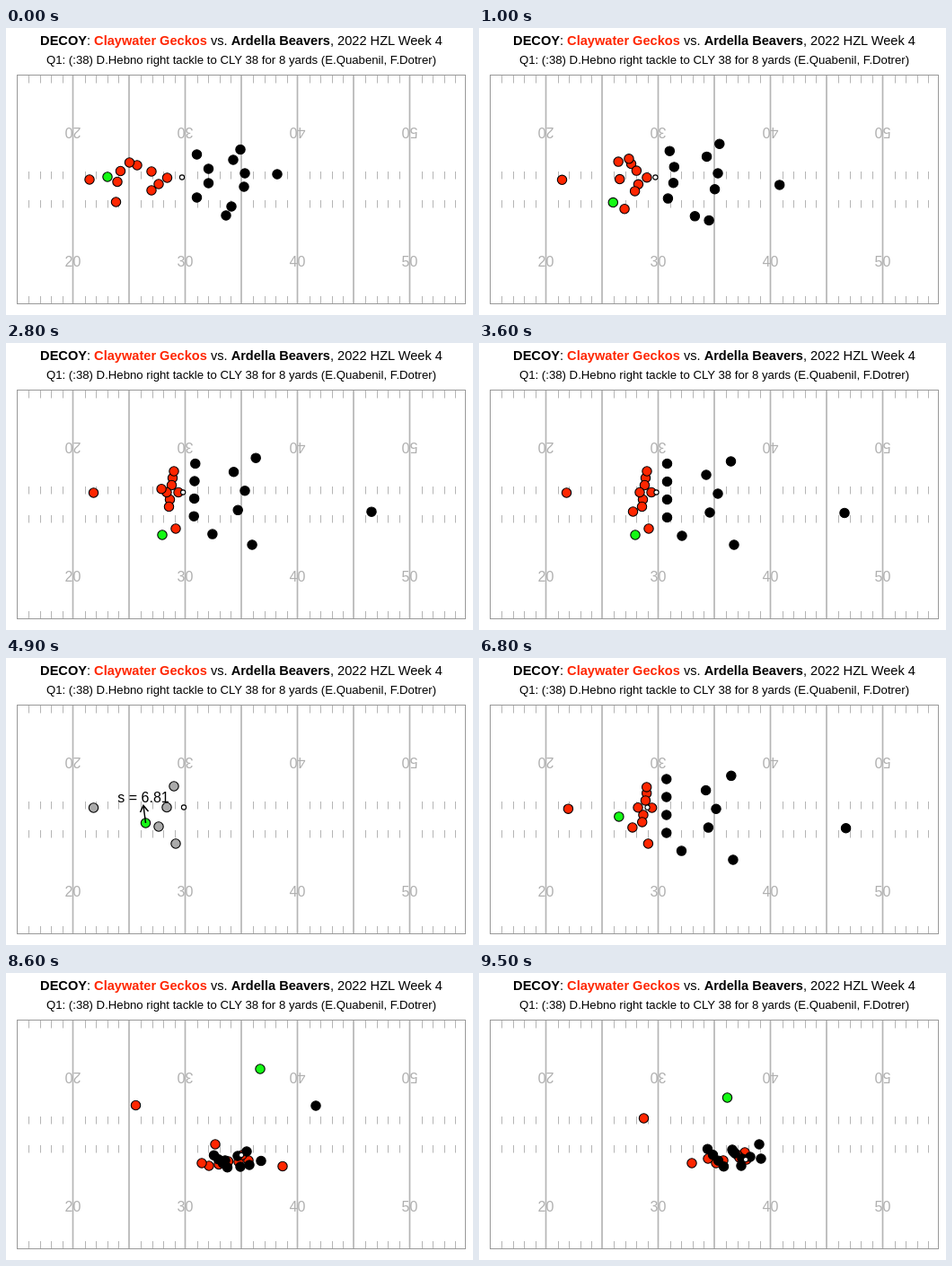
Animation of 520x320 px, one loop 10000 ms. Source, as an HTML page with a canvas:

```html
<!DOCTYPE html>
<html lang="en">
<head>
<meta charset="utf-8">
<title>Decoy play</title>
<style>
  html, body { margin: 0; width: 100%; height: 100%; overflow: hidden; background: #fff; }
  canvas { position: absolute; left: 0; top: 0; }
  p {
    position: absolute; left: 2px; width: 520px; margin: 0; z-index: 1;
    text-align: center; white-space: nowrap; color: #000;
    font-family: "Liberation Sans", Arial, sans-serif;
  }
  .title { top: 5px; font-size: 14.6px; line-height: 18px; }
  .title .home { color: #ff2600; }
  .play { top: 27px; font-size: 13.2px; line-height: 18px; }
</style>
</head>
<body>
<p class="title"><b>DECOY</b>: <b class="home">Claywater Geckos</b> vs. <b>Ardella Beavers</b>, 2022 HZL Week 4</p>
<p class="play">Q1: (:38) D.Hebno right tackle to CLY 38 for 8 yards (E.Quabenil, F.Dotrer)</p>
<canvas id="stage" width="520" height="320"></canvas>
<script>
const ctx = document.getElementById('stage').getContext('2d');
const FONT = '16px "Liberation Sans", Arial, sans-serif';
const LOOP = 10000, STEP = 100, RESUME = 6800;
const PHASES = { huddle: 0, set: 2100, shift: 3600, snap: 4900, mesh: 5800, hole: 6800, pile: 7700 };
const SNAP = PHASES.snap, END = PHASES.pile;
const RED = '#ff2600', GREEN = '#14fa14', GREY = '#aaa', BLACK = '#000';

// A pose is [x, y, dx, dy, bend]: player i stands at x + dx*i + bend*|i|, y + dy*i
const spot = ([x, y, dx = 0, dy = 0, bend = 0], i) => [x + dx * i + bend * Math.abs(i), y + dy * i];

// One path per player; a phase without a pose keeps the last, numeric keys are extra times
function unit(slots, poses) {
  return slots.map(i => {
    const keys = [];
    let pose;
    for (const phase in PHASES) {
      pose = poses[phase] || pose;
      keys.push([PHASES[phase], ...spot(pose, i)]);
    }
    for (const k in poses) if (!(k in PHASES)) keys.push([+k, ...spot(poses[k], i)]);
    return keys.sort((a, b) => a[0] - b[0]);
  });
}
const solo = poses => unit([0], poses)[0];

const line = [
  ...unit([-2, -1, 1, 2], {
    huddle: [178, 167, 4, 7, -12], set: [183.5, 166.5, -1, 8],
    mesh: [213, 185, -10, 8], hole: [248, 212, -11, 1.5], pile: [280, 206, -8, 3]
  }),
  solo({ huddle: [179.5, 167], set: [192, 166.5], mesh: [217.5, 187], hole: [247.5, 210], pile: [283, 199] })
];

const qb = solo({
  huddle: [124, 171.5], set: [179, 166.5], mesh: [104, 174], 6000: [94, 173],
  hole: [144.5, 147.5], pile: [183.5, 162]
});
const back = solo({
  huddle: [93, 169], 500: [91, 170], set: [97.5, 167], 5400: [128, 184], mesh: [174.5, 200],
  hole: [263, 203], pile: [298, 208]
});
const wing = solo({
  huddle: [127.5, 159.5], set: [174, 142], shift: [171.5, 188], snap: [170, 188], mesh: [214, 216],
  hole: [308, 215.5], pile: [290, 206]
});
const ends = unit([-1, 1], {
  huddle: [130, 172, -7.5, 22], set: [188, 175, 1, 32], mesh: [175, 192, -3, 15],
  hole: [225.5, 201.5, -7.5, 10.5], pile: [246, 209.5, -9, 2.5]
});
const decoy = solo({
  huddle: [113, 166], set: [174, 214], snap: [155.5, 184], 5300: [160, 143], mesh: [186.5, 112.5],
  6200: [227, 99], hole: [283, 107], pile: [276.5, 139]
});

const defence = [
  ...unit([-1.5, -0.5, 0.5, 1.5], {
    huddle: [232, 165, 0, 16, -13], set: [210.5, 163, -1, 19], shift: [209.5, 164.5, 0, 20],
    mesh: [188, 185, 0, 18], hole: [239, 210, 5, 4.5], pile: [263.5, 206, 6, 6.5]
  }),
  ...unit([-1, 0, 1], {
    huddle: [266, 162, 6, 15, -7], set: [266, 162, 3, 21, -9], shift: [266, 168, 2, 21, -11],
    mesh: [208, 182, -16, 11, 18], hole: [258, 204, -12, 5, -2], pile: [285, 201, -10, -4, 7]
  }),
  ...unit([-1, 1], {
    huddle: [248, 204, 3, -5], set: [249, 218, 14, 7], shift: [255, 220, 29, 5],
    mesh: [232, 220.5, 21, 2], hole: [266, 215, 5, -1], pile: [292.5, 211, 0.5, -4]
  }),
  solo({
    huddle: [261, 135.5], set: [274.5, 125], shift: [280.5, 132], mesh: [298, 112],
    hole: [345, 148], pile: [312, 191]
  }),
  solo({
    huddle: [302, 163], 1100: [339, 176], set: [407, 185.5], shift: [407, 189.5], 5200: [413, 191],
    mesh: [398, 193], hole: [284, 209.5], pile: [314, 207]
  })
];

const slope = (k, i, a) => (k[i + 1][a] - k[i][a]) / (k[i + 1][0] - k[i][0]);

function tangent(k, i, a) {
  if (i === 0) return slope(k, 0, a);
  if (i === k.length - 1) return slope(k, i - 1, a);
  const p = slope(k, i - 1, a), q = slope(k, i, a);
  return p * q <= 0 ? 0 : 2 * p * q / (p + q);
}

// Monotone cubic through the key points
function position(k, t) {
  let i = 0;
  while (i < k.length - 2 && t >= k[i + 1][0]) i++;
  const h = k[i + 1][0] - k[i][0], s = (t - k[i][0]) / h;
  const s2 = s * s, s3 = s2 * s;
  return [1, 2].map(a =>
    (2 * s3 - 3 * s2 + 1) * k[i][a] + (3 * s2 - 2 * s3) * k[i + 1][a] +
    h * ((s3 - 2 * s2 + s) * tangent(k, i, a) + (s3 - s2) * tangent(k, i + 1, a)));
}

const ramp = (t, from, span) => Math.min(1, Math.max(0, (t - from) / span));
const mix = (a, b, f) => a.map((v, i) => v + (b[i] - v) * f);

// Snapped to the quarterback, then handed to the back
function ballAt(t) {
  const snapped = mix([196 + 2 * ramp(t, 0, SNAP), 166.5], position(qb, t), ramp(t, SNAP, 200));
  const [x, y] = position(back, t);
  return mix(snapped, [x - 1, y], ramp(t, 5300, 200));
}

function stroke(...points) {
  ctx.beginPath();
  for (const [x, y] of points) ctx.lineTo(x, y);
  ctx.stroke();
}

function dot([x, y], r, fill) {
  ctx.beginPath();
  ctx.arc(x, y, r, 0, 2 * Math.PI);
  ctx.fillStyle = fill;
  ctx.fill();
  ctx.lineWidth = 1.1;
  ctx.strokeStyle = BLACK;
  ctx.stroke();
}

function drawField() {
  ctx.fillStyle = '#fff';
  ctx.fillRect(0, 0, 520, 320);
  ctx.font = FONT;
  ctx.textAlign = 'center';
  for (let yard = 16; yard < 55; yard++) {
    const x = 12 + (yard - 15) * 12.5;
    ctx.strokeStyle = '#b5b5b5';
    if (yard % 5 === 0) {
      ctx.lineWidth = 1.7;
      stroke([x, 53], [x, 307]);
    } else {
      ctx.lineWidth = 1;
      const tx = Math.floor(x) + 1.5;
      for (const y of [53, 160, 192, 299]) stroke([tx, y], [tx, y + 8.5]);
    }
    if (yard % 10 === 0) {
      ctx.fillStyle = '#b0b0b0';
      ctx.fillText(yard, x, 266);
      ctx.save();
      ctx.translate(x, 111);
      ctx.rotate(Math.PI);
      ctx.fillText(yard, 0, 0);
      ctx.restore();
    }
  }
  ctx.strokeStyle = '#999';
  ctx.lineWidth = 1;
  ctx.strokeRect(12.5, 52.5, 499, 255);
}

function drawSpeed([x, y]) {
  const tip = [x - 2.5, y - 19.5];
  ctx.strokeStyle = ctx.fillStyle = BLACK;
  ctx.lineWidth = 1.5;
  stroke([x, y], tip);
  stroke([x - 6, y - 12], tip, [x + 3, y - 13]);
  ctx.fillText('s = 6.81', x - 2.5, y - 23);
}

function draw(t) {
  const paused = t >= SNAP && t < RESUME;
  const u = paused ? SNAP : t < SNAP ? t : Math.min(t - RESUME + SNAP + STEP, END);
  const team = (paths, fill) => paths.forEach(p => dot(position(p, u), 5.2, fill));
  drawField();
  if (!paused) team(line, RED);
  team([qb, back, wing, ...ends], paused ? GREY : RED);
  team([decoy], GREEN);
  if (!paused) team(defence, BLACK);
  dot(ballAt(u), 2.6, '#fff');
  if (paused) drawSpeed(position(decoy, u));
}

const start = performance.now();
function tick() {
  const t = (performance.now() - start) % LOOP;
  draw(Math.floor(t / STEP) * STEP);
  requestAnimationFrame(tick);
}
tick();
</script>
</body>
</html>
```
